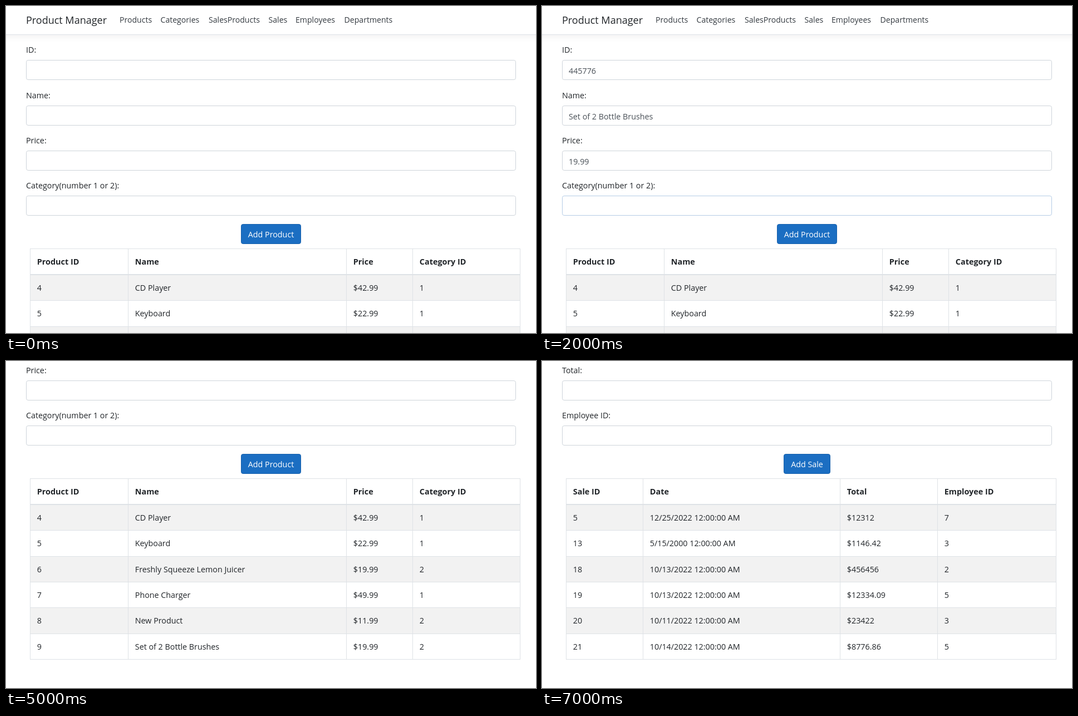
An HTML page with a canvas that plays this animation: 952x588 px, repeating every 8000 ms.

```html
<!DOCTYPE html>
<html lang="en">
<head>
<meta charset="utf-8">
<title>Product Manager</title>
<style>
html, body { margin: 0; width: 100%; height: 100%; overflow: hidden; background: #fff; }
canvas { display: block; }
</style>
</head>
<body>
<canvas id="stage" width="952" height="588"></canvas>
<script>
const W = 952, H = 588, LOOP = 8000, STEP = 1000, SCROLL = 225;
const ctx = document.getElementById('stage').getContext('2d');
const FAMILY = '"Open Sans", "Noto Sans", sans-serif';
const INK = '#212529', LINE = '#dee2e6';
const FIELD_TOPS = [97, 179, 260, 341];
const LINKS = [
  ['Products', 204], ['Categories', 277.5], ['SalesProducts', 364],
  ['Sales', 471.5], ['Employees', 520], ['Departments', 607.5]
];

const products = {
  labels: ['ID:', 'Name:', 'Price:', 'Category(number 1 or 2):'],
  button: 'Add Product', buttonWidth: 108,
  columns: [43, 219, 611, 730],
  head: ['Product ID', 'Name', 'Price', 'Category ID'],
  rows: [
    ['4', 'CD Player', '$42.99', '1'],
    ['5', 'Keyboard', '$22.99', '1'],
    ['6', 'Freshly Squeeze Lemon Juicer', '$19.99', '2'],
    ['7', 'Phone Charger', '$49.99', '1'],
    ['8', 'New Product', '$11.99', '2'],
    ['9', 'Set of 2 Bottle Brushes', '$19.99', '2']
  ]
};

const midnight = day => day + ' 12:00:00 AM';
const sales = {
  labels: ['ID:', 'Date:', 'Total:', 'Employee ID:'],
  button: 'Add Sale', buttonWidth: 84,
  dateField: 1,
  columns: [43, 181, 535, 710],
  head: ['Sale ID', 'Date', 'Total', 'Employee ID'],
  rows: [
    ['5', midnight('12/25/2022'), '$12312', '7'],
    ['13', midnight('5/15/2000'), '$1146.42', '3'],
    ['18', midnight('10/13/2022'), '$456456', '2'],
    ['19', midnight('10/13/2022'), '$12334.09', '5'],
    ['20', midnight('10/11/2022'), '$23422', '3'],
    ['21', midnight('10/14/2022'), '$8776.86', '5']
  ]
};

const ID = '445776', NAME = 'Set of 2 Bottle Brushes', PRICE = '19.99';
const scenes = [
  { page: products },
  { page: products, values: [ID, NAME], focus: 1, ring: 2, border: '#80bdff' },
  { page: products, values: [ID, NAME, PRICE], focus: 3, ring: 0, border: '#b5cce6' },
  { page: products, values: [ID, NAME, PRICE, '2'], hover: 'button', hand: [474, 412] },
  { page: products, scroll: SCROLL, arrow: [394, 516] },
  { page: products, scroll: SCROLL },
  { page: sales, hover: 'Employees', hand: [530, 21] },
  { page: sales, scroll: SCROLL }
];

function text(str, x, y, color = INK, size = 14.3, weight = 400, align = 'left') {
  ctx.font = `${weight} ${size}px ${FAMILY}`;
  ctx.fillStyle = color;
  ctx.textAlign = align;
  ctx.fillText(str, x, y);
}

function rect(x, y, w, h, color) {
  ctx.fillStyle = color;
  ctx.fillRect(x, y, w, h);
}

function box(x, y, w, h, fill, border) {
  ctx.beginPath();
  ctx.roundRect(x + .5, y + .5, w - 1, h - 1, 3.3);
  ctx.fillStyle = fill;
  ctx.fill();
  ctx.strokeStyle = border;
  ctx.lineWidth = 1;
  ctx.stroke();
}

function navbar(hover) {
  ctx.save();
  ctx.shadowColor = 'rgba(0,0,0,.05)';
  ctx.shadowBlur = 11;
  ctx.shadowOffsetY = 4;
  rect(-20, -20, W + 40, 72, '#fff');
  ctx.restore();
  rect(0, 51, W, 1, LINE);
  text('Product Manager', 36, 32, '#212529', 18);
  for (const [name, x] of LINKS) text(name, x, 30, name === hover ? '#1d2124' : '#343a40', 14.1);
}

function calendar(x, y) {
  ctx.strokeStyle = '#111';
  ctx.lineWidth = 1.2;
  ctx.strokeRect(x + .6, y + 2, 10.4, 10);
  rect(x, y + 1.4, 11.6, 3.2, '#111');
  rect(x + 2, y, 1.4, 2, '#111');
  rect(x + 8.2, y, 1.4, 2, '#111');
}

function field(scene, i) {
  const top = FIELD_TOPS[i], focused = scene.focus === i;
  text(scene.page.labels[i], 36, top - 13);
  if (focused && scene.ring) {
    const r = scene.ring;
    ctx.beginPath();
    ctx.roundRect(36 - r, top - r, 880 + 2 * r, 36 + 2 * r, 5);
    ctx.fillStyle = 'rgba(0,123,255,.22)';
    ctx.fill();
  }
  box(36, top, 880, 36, '#fff', focused ? scene.border : '#ced4da');
  const value = scene.values && scene.values[i];
  if (value) text(value, 48, top + 25, '#495057');
  if (scene.page.dateField === i) {
    ctx.letterSpacing = '0.55px';
    text('mm/dd/yyyy', 49, top + 23, '#495057');
    ctx.letterSpacing = '0px';
    calendar(888.5, top + 11);
  }
}

function button(page, hover) {
  const w = page.buttonWidth;
  box(476 - w / 2, 392, w, 36, hover ? '#0069d9' : '#1b6ec2', hover ? '#0062cc' : '#1861ac');
  text(page.button, 476, 416, '#fff', 14.3, 400, 'center');
}

function table({ columns, head, rows }) {
  const top = 436, first = 484, pitch = 46.3;
  const bottom = Math.round(first + rows.length * pitch) - 1;
  const rowTop = i => Math.round(first + i * pitch);
  rows.forEach((row, i) => {
    if (i % 2 === 0) rect(43, rowTop(i), 880, rowTop(i + 1) - rowTop(i), '#f2f2f2');
  });
  rows.forEach((row, i) => {
    rect(43, rowTop(i + 1) - 1, 881, 1, LINE);
    row.forEach((cell, c) => text(cell, columns[c] + 12.8, 512 + i * pitch));
  });
  rect(43, top, 881, 1, LINE);
  rect(43, 482, 881, 2, LINE);
  for (const x of [...columns, 923]) rect(x, top, 1, bottom - top + 1, LINE);
  head.forEach((cell, c) => text(cell, columns[c] + 12.8, 465, INK, 14.4, 700));
}

function cursor([x, y], shape) {
  ctx.save();
  ctx.translate(x, y);
  const path = new Path2D(shape);
  ctx.fillStyle = '#fff';
  ctx.fill(path);
  ctx.strokeStyle = '#111';
  ctx.lineWidth = 1;
  ctx.lineJoin = 'round';
  ctx.stroke(path);
  ctx.restore();
}

const ARROW = 'M.5 .5V15.5L4 12.2L6.3 17.4L8.6 16.4L6.4 11.4H10.6Z';
const HAND = 'M4.5 13V2Q4.5 .5 5.9 .5T7.3 2V7.5Q7.5 6.4 8.8 6.6T9.9 8' +
  'Q10.3 7 11.4 7.3T12.4 8.8Q13 8 13.8 8.5T14.5 10V15Q14.5 17 12.8 18.8V21.5H5.6V19' +
  'L1.2 13.2Q.2 11.6 1.2 10.8T3.3 11.4ZM7.3 7.5V11M9.9 8V11.3M12.4 8.8V11.6';

function draw(scene) {
  rect(0, 0, W, H, '#fff');
  ctx.save();
  ctx.translate(0, -(scene.scroll || 0));
  navbar(scene.hover);
  FIELD_TOPS.forEach((top, i) => field(scene, i));
  button(scene.page, scene.hover === 'button');
  table(scene.page);
  ctx.restore();
  if (scene.hand) cursor(scene.hand, HAND);
  if (scene.arrow) cursor(scene.arrow, ARROW);
}

function tick() {
  draw(scenes[Math.floor(performance.now() % LOOP / STEP)]);
  requestAnimationFrame(tick);
}
tick();
</script>
</body>
</html>
```
